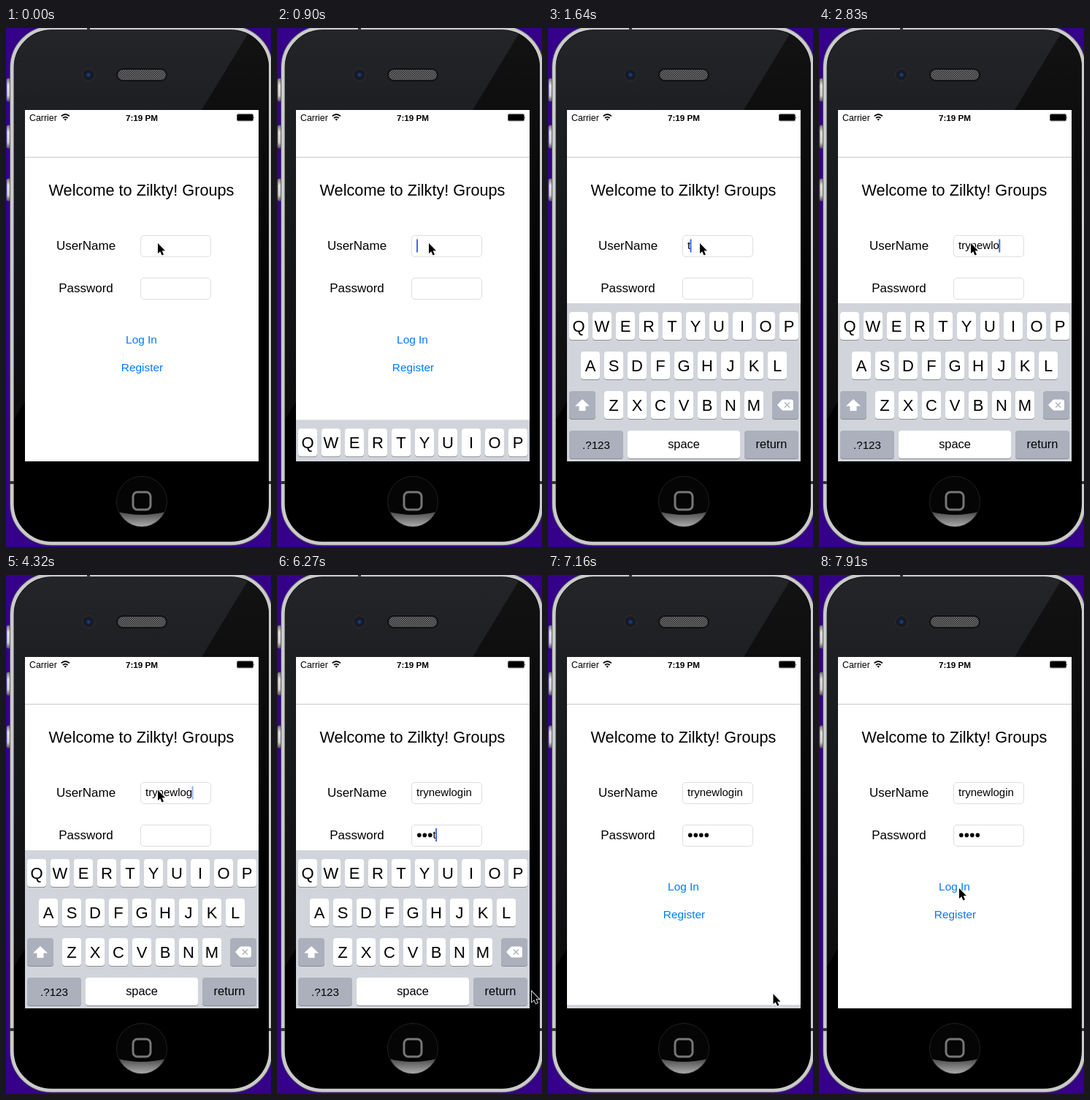
An HTML page for the animation above (8 s loop, 363 px wide and 709 px high).

```html
<!DOCTYPE html>
<html lang="en">
<head>
<meta charset="utf-8">
<title>Login form</title>
<style>
  html, body { margin: 0; height: 100%; overflow: hidden; background: #35008a; }
  svg { display: block; width: 100%; height: 100%; }
  text { font-family: "Liberation Sans", Arial, sans-serif; white-space: pre; }
  .mid { text-anchor: middle; }
  .link { fill: #007aff; font-size: 15.4px; }
  .label { font-size: 17px; }
  .field { fill: #fff; stroke: #dedede; }
  .input { font-size: 15px; }
  .button { fill: url(#metal); stroke: #777; stroke-width: .6; }
</style>
</head>
<body>
<svg viewBox="0 0 363 709">
  <defs>
    <linearGradient id="gloss" gradientUnits="userSpaceOnUse" x1="0" y1="0" x2="0" y2="545">
      <stop offset="0" stop-color="#242529"/><stop offset=".2" stop-color="#1e1f22"/>
      <stop offset="1" stop-color="#0c0c0d"/>
    </linearGradient>
    <linearGradient id="glass" gradientUnits="userSpaceOnUse" x1="0" y1="0" x2="0" y2="420">
      <stop offset="0" stop-color="#131314"/><stop offset="1" stop-color="#000"/>
    </linearGradient>
    <linearGradient id="shine" x1="0" y1="0" x2="0" y2="1">
      <stop offset="0" stop-color="#464646"/><stop offset="1" stop-color="#b8b8b8"/>
    </linearGradient>
    <linearGradient id="metal" x1="0" y1="0" x2="0" y2="1">
      <stop offset="0" stop-color="#777"/><stop offset=".3" stop-color="#ddd"/>
      <stop offset=".75" stop-color="#ccc"/><stop offset="1" stop-color="#555"/>
    </linearGradient>
    <radialGradient id="lens">
      <stop offset="0" stop-color="#23488c"/><stop offset="1" stop-color="#0c1226"/>
    </radialGradient>
    <pattern id="mesh" width="3" height="3" patternUnits="userSpaceOnUse">
      <path fill="#77777a" d="M0 0h3v3h-3z"/><path fill="#29292b" d="M0 0h1.5v1.5h-1.5zM1.5 1.5h1.5v1.5h-1.5z"/>
    </pattern>
    <clipPath id="body"><rect x="11" y="3" width="349" height="698" rx="51"/></clipPath>
    <clipPath id="screen"><path d="M26 112h320v480h-320z"/></clipPath>
    <clipPath id="home"><circle cx="186" cy="647" r="34"/></clipPath>
  </defs>

  <rect class="button" x="1" y="69" width="6" height="31" rx="2"/>
  <rect class="button" x="1" y="133" width="6" height="31" rx="2"/>
  <rect class="button" x="1" y="206" width="6" height="30" rx="2"/>
  <rect x="8.3" y="0" width="354" height="704" rx="54" stroke="#55565a" stroke-width="6.5"/>
  <rect x="8.3" y="0" width="354" height="704" rx="54" stroke="#cacbca" stroke-width="4.6"/>
  <path fill="#333" d="M111 0h4v3h-4zM5 619h6v4h-6zM360 619h3v4h-3z"/>
  <g clip-path="url(#body)">
    <path fill="url(#glass)" d="M11 0h350v420h-350z"/>
    <path fill="url(#gloss)" d="M11 0H336L11 535z"/>
  </g>
  <circle cx="113" cy="64" r="8.5" fill="#1b1c20" stroke="#2f3036"/>
  <circle cx="113" cy="64" r="4.5" fill="url(#lens)"/>
  <rect x="152" y="56" width="68" height="16" rx="8" fill="url(#mesh)" stroke="#111" stroke-width="2"/>
  <circle cx="186" cy="647" r="34.5" fill="#050505" stroke="#202020"/>
  <path clip-path="url(#home)" fill="url(#shine)" d="M150 660Q186 670 222 660V684H150z"/>
  <rect x="174" y="634" width="24" height="24" rx="6" fill="none" stroke="#77777a" stroke-width="3"/>

  <g clip-path="url(#screen)">
    <path fill="#fff" d="M26 112h320v480h-320z"/>
    <path fill="#c9c9c9" d="M26 176h320v1h-320z"/>
    <text x="32" y="126.7" font-size="12.4">Carrier</text>
    <g fill="none" stroke="#000" stroke-width="1.8">
      <path d="M75.7 120.4q5.6 -4.8 11.2 0M78 123q3.3 -2.8 6.6 0"/>
    </g>
    <path d="M79.5 124.6q1.8 -1.4 3.6 0l-1.8 2.2z"/>
    <text class="mid" x="186" y="126.5" font-size="11.7" font-weight="bold">7:19 PM</text>
    <rect x="316.5" y="117.8" width="22" height="9" rx="1.5" stroke="#555"/>
    <path d="M339.5 121q1.5 1.5 0 3z"/>
    <text class="mid" x="185.5" y="229" font-size="21.7">Welcome to Zilkty! Groups</text>
    <text class="mid label" x="109.5" y="302.8">UserName</text>
    <text class="mid label" x="109.5" y="360.8">Password</text>
    <rect class="field" x="184.5" y="283.5" width="96" height="29" rx="4.5"/>
    <rect class="field" x="184.5" y="341.5" width="96" height="29" rx="4.5"/>
    <text class="mid link" x="185.5" y="430.7">Log In</text>
    <text class="mid link" x="186.5" y="468.7">Register</text>
    <text class="input" id="name" x="191" y="302.3"></text>
    <g id="dots"></g>
    <text class="input" id="letter" y="360.3"></text>
    <rect id="caret" width="2" height="18" fill="#426bf2"/>
    <g id="keyboard"><path fill="#d1d5db" d="M26 376h320v216h-320z"/></g>
  </g>
  <path id="mouse" d="M0 0V14L3.2 11.2L5.6 16.5L8 15.4L5.7 10.3H10z" stroke="#fff" stroke-width="1.6" paint-order="stroke"/>
</svg>
<script>
const LOOP = 8000, TICK = 149.1, FIRST_TICK = 890.5;
const USER = "trynewlogin", PASSWORD = "test";
const $ = id => document.getElementById(id);

function add(parent, tag, attrs, text = "") {
  const node = document.createElementNS("http://www.w3.org/2000/svg", tag);
  for (const key in attrs) node.setAttribute(key, attrs[key]);
  node.textContent = text;
  return parent.appendChild(node);
}

function addKey(x, row, width, label, { size = 22, fill = "#fff", base = 27 } = {}) {
  const y = 388 + 54 * row, box = { x, width, height: 38, rx: 4 };
  add($("keyboard"), "rect", { ...box, y: y + 1, fill: "#8a8d93" });
  add($("keyboard"), "rect", { ...box, y, fill });
  add($("keyboard"), "text", { x: x + width / 2, y: y + base, "font-size": size, class: "mid" }, label);
}

const GREY = "#abb0bc";
[["QWERTYUIOP", 29], ["ASDFGHJKL", 45], ["ZXCVBNM", 77]].forEach(([letters, x], row) =>
  [...letters].forEach((letter, i) => addKey(x + 32 * i, row, 26, letter)));
addKey(29, 2, 36, "", { fill: GREY });
addKey(307, 2, 36, "", { fill: GREY });
addKey(29, 3, 74, ".?123", { size: 15.2, fill: GREY, base: 24.5 });
addKey(109, 3, 154, "space", { size: 16.4, base: 23.5 });
addKey(269, 3, 74, "return", { size: 16.4, fill: GREY, base: 23.5 });
add($("keyboard"), "path", { fill: "#fff", d: "M47 507L57 516.5H51.5V523H42.5V516.5H37z" });
add($("keyboard"), "path", { fill: "#fff", d: "M314 515L320 508.5Q321 507.5 322.5 507.5H333Q336 507.5 336 510.5V519.5Q336 522.5 333 522.5H322.5Q321 522.5 320 521.5z" });
add($("keyboard"), "path", { stroke: GREY, "stroke-width": 1.3, d: "M324 511.5l7 7m0 -7l-7 7" });

const dots = [...PASSWORD].map((_, i) =>
  add($("dots"), "circle", { cx: 194.8 + 7.5 * i, cy: 355.4, r: 2.8 }));

// [time, number of characters]
const userTyping = [[1640, 1], [1780, 2], [1930, 4], [2230, 5], [2380, 6], [2530, 7],
  [2830, 8], [2980, 9], [3130, 10], [3570, 9], [4470, 11]];
const passwordTyping = [[5520, 1], [5670, 2], [5820, 3], [5970, 4]];
// [time, x, y]
const mousePath = [[4920, 208, 294], [6258, 349, 569], [6407, 338, 588], [6705, 309, 573],
  [7150, 309, 573], [7450, 255, 500], [7750, 196, 433], [7890, 192, 428]];

const typed = (steps, t) => steps.reduce((n, [time, count]) => t >= time ? count : n, 0);

function position(path, t) {
  const i = path.findIndex(([time]) => time >= t);
  if (i < 1) return path.at(i).slice(1);
  const [t0, x0, y0] = path[i - 1], [t1, x1, y1] = path[i], k = (t - t0) / (t1 - t0);
  return [x0 + (x1 - x0) * k, y0 + (y1 - y0) * k];
}

// Remaining share of a critically damped spring
function spring(ms) {
  const x = Math.max(0, ms) * 0.01826;
  return (1 + x) * Math.exp(-x);
}

function draw(t) {
  const tick = Math.max(0, FIRST_TICK + Math.floor((t - FIRST_TICK) / TICK) * TICK);
  const hidden = t < 900 ? 1 : tick < 6800 ? spring(tick - 836) : 1 - spring(tick - 6838);
  $("keyboard").setAttribute("transform", `translate(0 ${216 * hidden})`);
  $("keyboard").style.display = hidden > 0.999 ? "none" : "";

  $("name").textContent = USER.slice(0, typed(userTyping, t));
  const count = typed(passwordTyping, t), closed = t >= 6840;
  const masked = closed ? count : Math.max(0, count - 1);
  dots.forEach((dot, i) => dot.style.display = i < masked ? "" : "none");
  $("letter").textContent = closed ? "" : PASSWORD.slice(masked, count);
  $("letter").setAttribute("x", 191 + 7.5 * masked);

  const inPassword = t >= 4920;
  const width = node => node.textContent ? node.getComputedTextLength() - 0.6 : 0;
  $("caret").setAttribute("x", 191 + (inPassword ? 7.5 * masked + width($("letter")) : width($("name"))));
  $("caret").setAttribute("y", inPassword ? 346 : 288.5);
  $("caret").style.opacity = t < 900 || closed || (t >= 3720 && t < 4320) ? 0 : t >= 4320 && t < 4470 ? 0.55 : 1;

  const [x, y] = position(mousePath, tick);
  $("mouse").setAttribute("transform", `translate(${x} ${y})`);
  $("mouse").style.display = t >= 4920 && t < 6260 ? "none" : "";
}

const start = performance.now();
function loop() {
  draw((performance.now() - start) % LOOP);
  requestAnimationFrame(loop);
}
loop();
</script>
</body>
</html>
```
